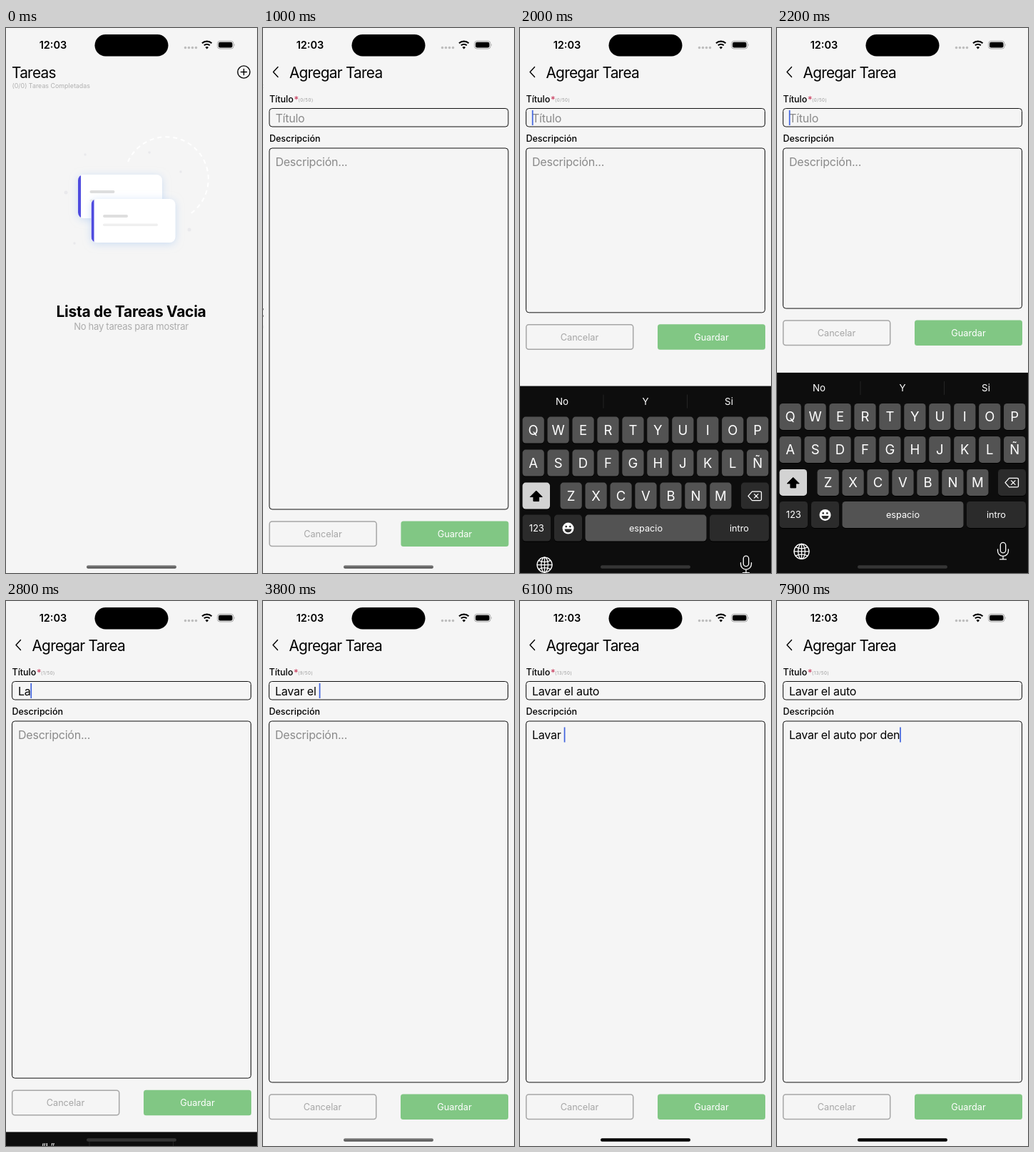
These frames come from a looping animation (352x762 px, 8 s). An HTML page:

```html
<!DOCTYPE html>
<html lang="es">
<head>
<meta charset="utf-8">
<title>Tareas</title>
<style>
  html, body { margin: 0; width: 100%; height: 100%; overflow: hidden; background: #f5f5f5; }
  svg { display: block; font-family: Inter, Roboto, sans-serif; }
  text { white-space: pre; }
  .mid { text-anchor: middle; }
  .head { font-size: 20.8px; letter-spacing: -.035em; }
  .label { font-size: 12.5px; font-weight: 500; }
  .input { font-size: 16px; letter-spacing: -.014em; }
  .button { font-size: 12.7px; }
  .line { fill: none; stroke: #000; stroke-linecap: round; stroke-linejoin: round; }
  .glyph { fill: none; stroke: #fff; stroke-width: 1.3; stroke-linecap: round; stroke-linejoin: round; }
</style>
</head>
<body>
<svg width="352" height="762" viewBox="0 0 352 762">
  <defs>
    <filter id="glow" x="-30%" y="-40%" width="160%" height="190%">
      <feDropShadow dx="0" dy="2" stdDeviation="6" flood-color="#a9c8f2" flood-opacity=".55"/>
    </filter>
    <linearGradient id="bar" x2="0" y2="1">
      <stop stop-color="#858585"/><stop offset="1" stop-color="#4c4c4c"/>
    </linearGradient>
    <clipPath id="cardClip"><rect width="118" height="61" rx="8"/></clipPath>
    <g id="card">
      <rect width="118" height="61" rx="8" fill="#fff" filter="url(#glow)"/>
      <rect width="4" height="61" fill="#4f4bdf" clip-path="url(#cardClip)"/>
      <rect x="16.5" y="22" width="35" height="4" rx="2" fill="#dedede"/>
      <rect x="16.5" y="34.5" width="77" height="3.5" rx="1.7" fill="#efefef"/>
    </g>
  </defs>

  <g id="list">
    <rect width="352" height="762" fill="#f5f5f5"/>
    <text class="head" x="8" y="69.5">Tareas</text>
    <text x="8.5" y="83.5" font-size="8.9" fill="#b0b0b0">(0/0) Tareas Completadas</text>
    <g id="add" class="line" stroke-width="1.4">
      <circle cx="333.5" cy="61.5" r="8.6"/><path d="M329.5 61.5h8M333.5 57.5v8"/>
    </g>
    <path d="M171 187A59 59 0 1 1 258 260" fill="none" stroke="#fff" stroke-width="2" stroke-dasharray="6 5"/>
    <g id="dots" fill="#e9e9ec"></g>
    <use href="#card" x="101" y="205"/>
    <use href="#card" x="119.5" y="239"/>
    <text class="mid" x="175.5" y="403.5" font-size="21" font-weight="700" letter-spacing="-.3">Lista de Tareas Vacia</text>
    <text class="mid" x="175.5" y="421.5" font-size="13" letter-spacing="-.26" fill="#ababab">No hay tareas para mostrar</text>
  </g>

  <g id="form">
    <rect width="352" height="762" fill="#f5f5f5"/>
    <path class="line" stroke-width="1.4" d="M20.5 54.5l-6.500 7 6.500 7"/>
    <text class="head" x="36.500" y="69.500">Agregar Tarea</text>
    <text class="label" x="8.500" y="103.500">Título</text>
    <text x="43" y="104.500" font-size="13" fill="#c8385a">*</text>
    <text id="count" x="49" y="102.500" font-size="6.200" letter-spacing=".5" fill="#999"></text>
    <rect x="8.500" y="112.500" width="335" height="25.500" rx="4" fill="none" stroke="#111"/>
    <text id="title" class="input" x="17" y="131.500"></text>
    <text class="label" x="8.500" y="159">Descripción</text>
    <rect id="area" x="8.500" y="168" width="335" height="505" rx="4" fill="none" stroke="#111"/>
    <text id="note" class="input" x="17" y="193"></text>
    <rect id="caret" width="1.700" height="21" fill="#3f62dd"/>
    <g id="actions">
      <rect x="8.700" y="690" width="150" height="34.500" rx="3.500" fill="none" stroke="#a6a6a6" stroke-width="1.500"/>
      <text class="button mid" x="83.500" y="712" fill="#a6a6a6">Cancelar</text>
      <rect x="193" y="689.500" width="151" height="35.500" rx="3.500" fill="#81c784"/>
      <text class="button mid" x="268.500" y="712" fill="#fff">Guardar</text>
    </g>
  </g>

  <g id="status">
    <text class="mid" x="66" y="29" font-size="14.500" font-weight="600">12:03</text>
    <rect x="124.500" y="9" width="103" height="30.500" rx="15.200"/>
    <path d="M251.500 27.500h18" stroke="#bdbdbd" stroke-width="3.600" stroke-linecap="round" stroke-dasharray="0 5"/>
    <path d="M275 21.200a10 10 0 0 1 13.500 0M277.800 24.300a6 6 0 0 1 8 0" fill="none" stroke="#000" stroke-width="2.200"/>
    <path d="M281.750 29.500l-2.300-2.500a3.300 3.300 0 0 1 4.600 0z"/>
    <rect x="296.500" y="18.300" width="22.500" height="10.700" rx="3.500" fill="none" stroke="#a5a5a5"/>
    <rect x="298" y="19.800" width="19.500" height="7.700" rx="2.300"/>
    <path d="M320.300 22v3.500q1.500-1.750 0-3.500" fill="#a5a5a5"/>
  </g>

  <g id="keyboard">
    <rect y="481" width="352" height="290" fill="#0d0d0d"/>
    <path d="M117 493v19M234.500 493v19" stroke="#252525"/>
    <g id="hints" class="mid" fill="#fff" font-size="13.300"></g>
    <g id="keys"></g>
    <path d="M22.700 627.500l8.500 8.500h-4.700v6h-7.600v-6h-4.700z" stroke="#000" stroke-linejoin="round"/>
    <path class="glyph" d="M325.500 628.500h11.500q1.500 0 1.500 1.500v9.500q0 1.500-1.500 1.500h-11.500l-5.500-6.250zM328.500 632l5.500 5.500M334 632l-5.500 5.500"/>
    <circle cx="67.500" cy="680" r="8" fill="#fff"/>
    <g fill="#2b2b2b"><circle cx="64.700" cy="677.500" r="1.300"/><circle cx="70.300" cy="677.500" r="1.300"/><path d="M62.500 681h10a5 4.700 0 0 1-10 0"/></g>
    <g class="glyph">
      <circle cx="34.500" cy="731" r="10.500"/><ellipse cx="34.500" cy="731" rx="4.800" ry="10.500"/>
      <path d="M24 731h21M34.500 720.500v21M26.500 725q8 4 16 0M26.500 737q8-4 16 0"/>
      <rect x="313.300" y="718.500" width="7.400" height="14.500" rx="3.700"/>
      <path d="M309.500 728v2a7.500 7.500 0 0 0 15 0v-2M317 737.500v4.500M312.500 742h9"/>
    </g>
  </g>
  <rect id="home" x="113" y="751.300" width="126" height="4.400" rx="2.200"/>
</svg>

<script>
const LOOP = 8000;
const $ = id => document.getElementById(id);

$('dots').innerHTML = [[84, 230], [96, 301], [111, 177], [201, 174], [245, 201], [257, 282]]
  .map(([x, y], i) => `<circle cx="${x}" cy="${y}" r="${i % 5 ? 1.7 : 2.5}"/>`).join('');

const key = (x, y, width, label = '', fill = '#535353', size = 18.5) =>
  `<rect x="${x}" y="${y + 1}" width="${width}" height="37" rx="4.5" fill="#000"/>
   <rect x="${x}" y="${y}" width="${width}" height="37" rx="4.5" fill="${fill}"/>
   <text class="mid" x="${x + width / 2}" y="${y + 18.5 + size * .36}" font-size="${size}" fill="#fff">${label}</text>`;
const row = (letters, x, y) => [...letters].map((c, i) => key(x + i * 34.95, y, 30.3, c)).join('');
const dark = '#2b2b2b';
$('keys').innerHTML =
  row('QWERTYUIOP', 3.5, 524) + row('ASDFGHJKLÑ', 3.5, 570) + row('ZXCVBNM', 56.5, 616) +
  key(3.5, 616, 38.5, '', '#d3d3d3') + key(310, 616, 39, '', dark) +
  key(3.5, 661, 39.5, '123', dark, 13) + key(48, 661, 39, '', dark) +
  key(91.5, 661, 170, 'espacio', '#535353', 12.7) + key(266, 661, 83, 'intro', dark, 12.7);

// Times at which each character appears, in tenths of a second.
const title = { text: 'Lavar el auto', at: [26, 28, 29, 30, 32, 33, 35, 36, 38, 40, 41, 42, 44] };
const note = {
  text: 'Lavar el auto por den',
  at: [53, 55, 57, 58, 59, 61, 62, 64, 65, 66, 67, 68, 69, 71, 72, 73, 74, 75, 76, 78, 79]
};
const typed = ({ text, at }, t) => text.slice(0, at.filter(s => s * 100 <= t).length);

// Critically damped spring from 0 to 1; speed is in 1/s.
const spring = (ms, speed) => {
  const x = Math.max(0, ms) * speed / 1000;
  return 1 - (1 + x) * Math.exp(-x);
};
const raised = (t, speed) => 281 * (spring(t - 1760, speed) - spring(t - 2560, speed));
const shift = (id, x, y) => $(id).setAttribute('transform', `translate(${x} ${y})`);

function setText(id, text) {
  if ($(id).textContent !== text) $(id).textContent = text;
}

function setField(id, text, hint) {
  setText(id, text || hint);
  $(id).setAttribute('fill', text ? '#000' : '#8a8a8a');
}

let hintState;
function setHints(words) {
  if (hintState === words) return;
  hintState = words;
  $('hints').innerHTML = words.split('|').map((w, i) => `<text x="${59 + i * 117}" y="507">${w}</text>`).join('');
}

function draw(t) {
  const push = spring(t - 250, 12);
  shift('list', -105 * push, 0);
  shift('form', 352 * (1 - push), 0);
  $('add').setAttribute('opacity', t < 100 ? 1 : .3);

  const name = typed(title, t), body = typed(note, t);
  setField('title', name, 'Título');
  setField('note', body, 'Descripción...');
  // The counter falls behind while the keyboard closes.
  setText('count', `(${typed(title, t < 2900 ? t - 150 : t).length}/50)`);

  const inNote = t >= 5000, active = inNote ? body : name;
  const end = active ? $(inNote ? 'note' : 'title').getComputedTextLength() : 0;
  $('caret').setAttribute('x', 16.8 + end);
  $('caret').setAttribute('y', inNote ? 176.5 : 115);
  $('caret').setAttribute('opacity', t < 1800 ? 0 : 1);

  const lift = raised(t, 24), keys = raised(t, 18);
  $('area').setAttribute('height', 505 - lift);
  shift('actions', 0, -lift);
  shift('keyboard', 0, 281 - keys);
  setHints(name ? '“L”' : 'No|Y|Si');
  $('home').setAttribute('fill', keys > 8 ? '#353535' : t < 4800 ? 'url(#bar)' : '#000');
}

const start = performance.now();
function tick() {
  draw((performance.now() - start) % LOOP);
  requestAnimationFrame(tick);
}
tick();
</script>
</body>
</html>
```
